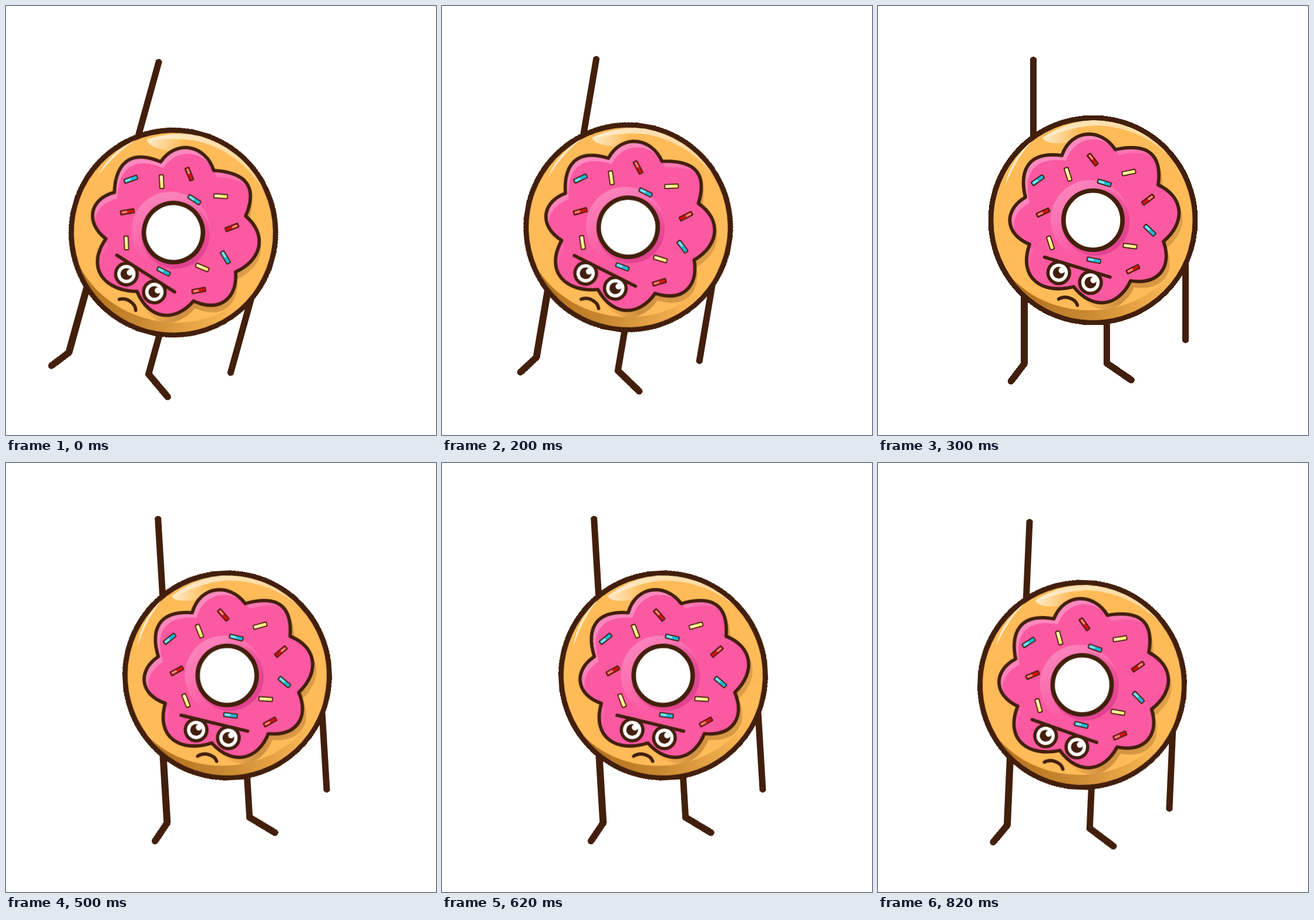
An HTML page for the animation above (0.9 s loop, 732 by 729 pixels).

```html
<!DOCTYPE html>
<html lang="en">
<head>
<meta charset="utf-8">
<title>Grumpy donut swing</title>
<style>
  html, body { margin: 0; width: 100%; height: 100%; overflow: hidden; background: #fff; }
  svg { display: block; width: 100%; height: 100%; }
  .line { fill: none; stroke: #421f0c; stroke-linecap: round; stroke-linejoin: round; }
  .dark { fill: #421f0c; }
  .crisp { shape-rendering: crispEdges; }
  #donut { transform-origin: 0 0; animation: swing 900ms step-end infinite; }
  @keyframes swing {
    0%, 100% { transform: translate(285px, 385px) rotate(15.5deg); }
    22.22% { transform: translate(317px, 376px) rotate(9.65deg); }
    33.33% { transform: translate(366px, 364px) rotate(0deg); }
    44.44% { transform: translate(421.5px, 338px) rotate(-12.95deg); }
    55.55% { transform: translate(376.5px, 361px) rotate(-3.45deg); }
    77.77% { transform: translate(347.5px, 377px) rotate(2.5deg); }
  }
</style>
</head>
<body>
<svg viewBox="0 0 732 729">
  <defs>
    <path id="icing" d="M251 325C240 280 255 246 313 254C329 208 380 207 404 244C459 232 484 252 477 304C520 324 525 367 486 400C501 444 478 474 430 467C410 510 366 519 333 477C279 491 238 462 258 405C216 388 213 347 251 325Z"/>
    <clipPath id="inIcing"><use href="#icing"/></clipPath>
    <clipPath id="inDough"><circle cx="366" cy="364" r="170"/></clipPath>

    <g id="eye">
      <circle class="dark" r="21.2"/>
      <circle r="15.6" fill="#fff"/>
      <circle class="dark" r="10"/>
      <circle cx="5" cy="-4" r="5.2" fill="#fff"/>
    </g>

    <linearGradient id="crust" gradientUnits="userSpaceOnUse" x1="215" x2="510" y1="0" y2="0">
      <stop stop-color="#b06c18"/>
      <stop offset=".45" stop-color="#c78730"/>
      <stop offset="1" stop-color="#ffbb57"/>
    </linearGradient>
    <linearGradient id="shade" gradientUnits="userSpaceOnUse" x1="340" x2="520" y1="0" y2="0">
      <stop stop-color="#cf9040" stop-opacity="0"/>
      <stop offset=".35" stop-color="#cf9040"/>
      <stop offset="1" stop-color="#dfa04a"/>
    </linearGradient>
    <linearGradient id="gleam" gradientUnits="userSpaceOnUse" x1="280" x2="342" y1="0" y2="0">
      <stop stop-color="#ffeccb"/>
      <stop offset="1" stop-color="#ffeccb" stop-opacity="0"/>
    </linearGradient>
    <linearGradient id="rim" gradientUnits="userSpaceOnUse" x1="280" x2="495" y1="0" y2="0">
      <stop stop-color="#ffe9c4"/>
      <stop offset="1" stop-color="#ffd797"/>
    </linearGradient>
    <linearGradient id="gloss" gradientUnits="userSpaceOnUse" x1="270" y1="250" x2="400" y2="420">
      <stop offset=".2" stop-color="#fb88be"/>
      <stop offset=".75" stop-color="#fb59a1"/>
    </linearGradient>
    <linearGradient id="dipLight" gradientUnits="userSpaceOnUse" x1="318" y1="305" x2="375" y2="400">
      <stop stop-color="#fb85bc"/>
      <stop offset="1" stop-color="#fb59a1"/>
    </linearGradient>
    <linearGradient id="dipShade" gradientUnits="userSpaceOnUse" x1="335" y1="335" x2="400" y2="415">
      <stop stop-color="#e0428f" stop-opacity="0"/>
      <stop offset="1" stop-color="#e0428f"/>
    </linearGradient>
  </defs>

  <g id="donut">
    <g transform="translate(-366 -364)">
      <path class="line crisp" stroke-width="11.5" d="M264.5 92V225M249 485V608L226.5 637.5M389.5 530V607L431 635.5M523.5 425V567"/>

      <circle class="dark crisp" cx="366" cy="364" r="178.4"/>
      <circle cx="366" cy="364" r="169.5" fill="#ffbb57"/>
      <g clip-path="url(#inDough)">
        <path fill="url(#crust)" d="M207 434C240 490 300 517 360 517C440 517 505 470 535 400L544 560H180Z"/>
        <path fill="url(#rim)" d="M283 222C312 202 345 194 370 194C425 196 470 220 497 256C465 224 420 204 372 203C340 204 312 213 283 225Z"/>
        <path fill="url(#gleam)" d="M280 224C300 209 335 200 360 200L340 226C322 236 284 236 280 224Z"/>
        <path fill="#ffebc8" d="M217 304C223 272 242 246 265 226C245 248 229 274 217 304Z"/>
        <use href="#icing" fill="url(#shade)" x="6" y="11"/>
      </g>

      <use href="#icing" fill="url(#gloss)"/>
      <g clip-path="url(#inIcing)"><use href="#icing" x="7" y="9" fill="#fb59a1"/></g>
      <circle cx="361" cy="363" r="67" fill="url(#dipLight)"/>
      <circle cx="370" cy="366" r="58.5" fill="url(#dipShade)"/>
      <use href="#icing" class="line" stroke-width="5.8"/>
      <circle class="line" cx="366" cy="364" r="50.2" stroke-width="7.6" style="fill:#fff"/>

      <g id="sprinkles"></g>

      <use href="#eye" x="307.7" y="453.3"/>
      <use href="#eye" x="361.7" y="469.9"/>
      <path class="line" stroke-width="5.6" d="M283.5 426.8L395 460.6M307.5 498C317 492 335 495 339.5 508.5"/>
    </g>
  </g>
</svg>
<script>
  const colors = {
    red: ['#d01313', '#f4857c'],
    cyan: ['#1fb8d8', '#84e2ee'],
    yellow: ['#fff07a', '#fff9c4']
  };
  // color, x, y, angle
  const sprinkles = [
    ['red', 365.5, 261, 52], ['cyan', 272, 296, -35], ['yellow', 323.5, 286, 72],
    ['yellow', 427, 283, -12], ['cyan', 385.3, 300.7, 17], ['red', 459.7, 329, 143],
    ['red', 281, 351, -25], ['cyan', 462.5, 381, 43], ['yellow', 293.5, 402.5, 72],
    ['yellow', 429, 408, 7], ['cyan', 367.5, 432, 11], ['red', 434, 447.3, -26]
  ];
  document.getElementById('sprinkles').innerHTML = sprinkles.map(([name, x, y, angle]) => {
    const [base, light] = colors[name];
    return `<g transform="translate(${x} ${y}) rotate(${angle})">
      <rect class="dark" x="-12.5" y="-4.4" width="25" height="8.8" rx="2"/>
      <rect x="-10.7" y="-2.6" width="21.4" height="5.2" rx=".8" fill="${base}"/>
      <rect x="-9.7" y="-2" width="9.5" height="3.6" rx=".8" fill="${light}"/>
    </g>`;
  }).join('');
</script>
</body>
</html>
```
